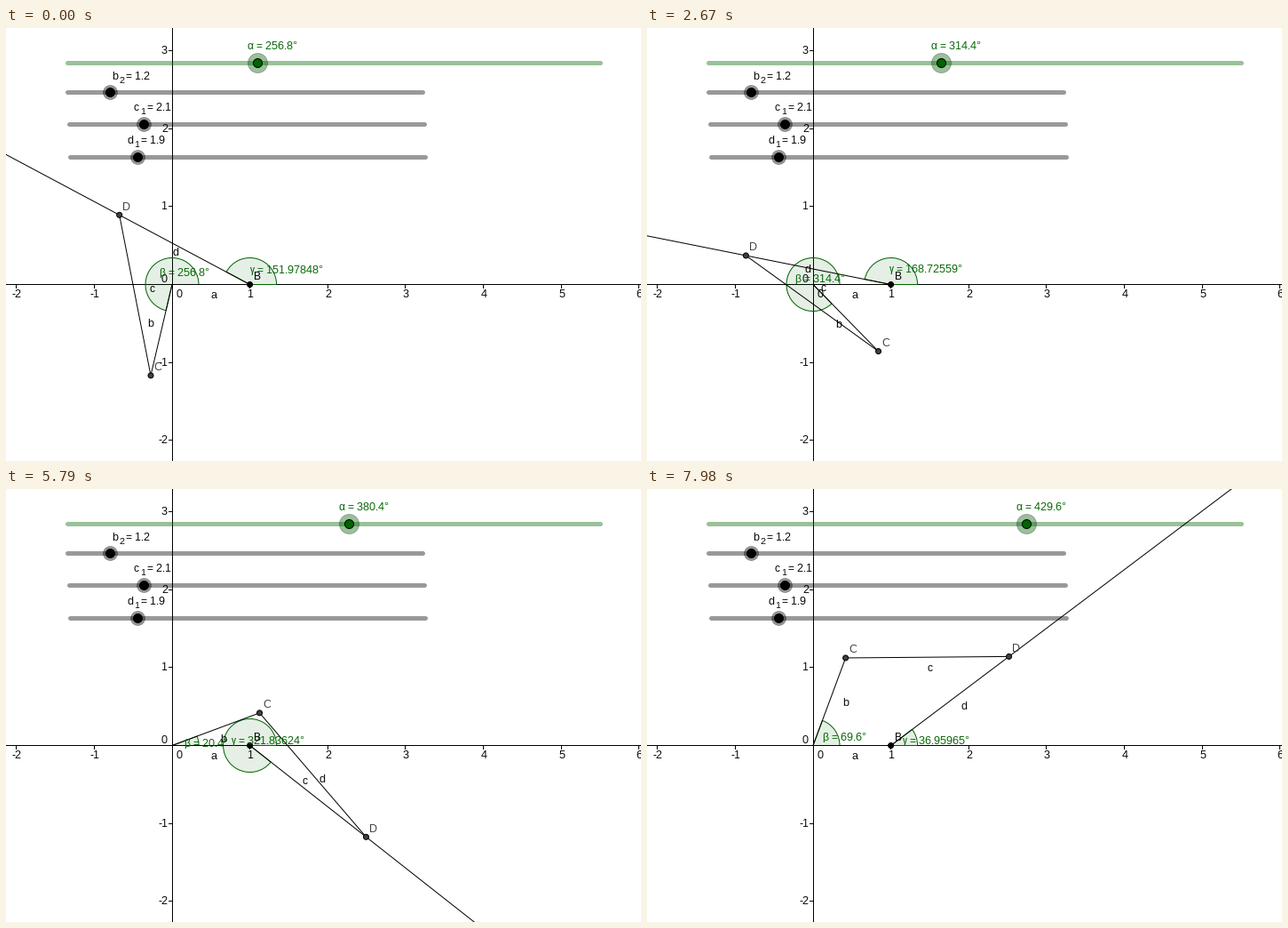
These frames come from a looping animation (715 px wide and 487 px high, 8 s). A matplotlib script:

```python
import numpy as np
import matplotlib.pyplot as plt
from matplotlib.animation import FuncAnimation
from matplotlib.patches import Circle, Wedge

W, H, DPI = 715, 487, 100
PX = 72 / DPI                      # points per pixel
ORIGIN = np.array([187.0, 288.5])
UNIT = 87.6
CRANK, COUPLER, ROCKER = 1.2, 2.1, 1.9
GREEN = (0, 100 / 255, 0)
GREY = "#404040"
SHADE = (0, 0, 0, 0.25)            # rim of the slider knobs
ARC = 30                           # radius of the angle marks

# Times (ms) and the number of slider changes made by then
TIMES = [0, 30, 810, 870, 1380, 1470, 1650, 1710, 2490, 2520, 2670, 2730,
         3270, 3360, 3990, 4020, 4110, 4170, 4950, 4980, 5700, 5790, 5820,
         6510, 6600, 6960, 7020, 7380, 7470, 7980]
COUNTS = [0, 1, 15, 16, 25, 26, 29, 30, 44, 45, 47, 48,
          58, 59, 70, 71, 72, 73, 87, 88, 101, 102, 103,
          116, 117, 123, 124, 131, 132, 142]
STEP_MS, LOOP_MS = 20, 8000

plt.rcParams["font.family"] = "Liberation Sans"
plt.rcParams["text.hinting"] = "native"
plt.rcParams["text.hinting_factor"] = 1
plt.rcParams["path.snap"] = False

fig = plt.figure(figsize=(W / DPI, H / DPI), dpi=DPI, facecolor="white")
ax = fig.add_axes([0, 0, 1, 1])
ax.set_xlim(0, W)
ax.set_ylim(H, 0)
ax.axis("off")


def line(xs, ys, color="black", width=1, **kw):
    return ax.plot(xs, ys, color=color, lw=width * PX, **kw)[0]


def dot(x, y, size, fill, edge="none", zorder=4):
    c = Circle((x, y), size / 2, fc=fill, ec=edge, lw=PX, zorder=zorder)
    return ax.add_patch(c)


def text(x, y, s, color="black", size=12, ha="left"):
    return ax.text(x, y, s, color=color, fontsize=size * PX, ha=ha,
                   va="baseline", zorder=5)


def to_px(x, y):
    return ORIGIN + UNIT * np.array([x, -y])


def polar(r, deg):
    a = np.radians(deg)
    return np.array([r * np.cos(a), r * np.sin(a)])


def fmt(v, digits):
    s = f"{v:.{digits}f}"
    return s.rstrip("0").rstrip(".") + "°"


def draw_grid():
    ox, oy = np.floor(ORIGIN) + 0.5
    line([0, W], [oy, oy], zorder=0)
    line([ox, ox], [0, H], zorder=0)
    for n in range(-2, 7):
        if n == 0:
            continue
        x, y = np.floor(to_px(n, n)) + 0.5
        line([x, x], [oy, oy + 4], zorder=0)
        text(x + 0.5, 303, str(n), ha="center")
        if n < 4:
            line([ox - 4, ox], [y, y], zorder=0)
            text(182, y + 3.5, str(n), ha="right")
    text(192, 303, "0")
    text(182, 286, "0", ha="right")


def draw_track(x, y, length, color):
    line([x, x + length], [y, y], color, 5, alpha=0.4,
         solid_capstyle="round", zorder=1)


def draw_slider(x, y, value, name, sub, tx, ty):
    draw_track(x, y, 400, "black")
    knob = x + 40 * value
    dot(knob, y, 16, (0, 0, 0, 0.4), SHADE, zorder=1.5)
    dot(knob, y, 11, "black", zorder=1.6)
    text(tx, ty, name)
    text(tx + 8, ty + 4, sub, size=10)
    text(tx + 16, ty, f"= {value}")


def sector(center):
    w = Wedge(center, ARC, -90, 0, fc=GREEN + (0.1,), ec=GREEN, lw=PX,
              zorder=0.5)
    return ax.add_patch(w)


draw_grid()
draw_track(69.5, 39.5, 600, GREEN)
draw_slider(69.5, 72.5, 1.2, "b", "2", 119, 58)
draw_slider(71.5, 108.5, 2.1, "c", "1", 143, 93)
draw_slider(72.5, 145.5, 1.9, "d", "1", 136, 130)

halo = dot(0, 39.5, 22, GREEN + (0.4,), SHADE, zorder=1.5)
knob = dot(0, 39.5, 10, GREEN, "black", zorder=1.6)
alpha_text = text(0, 24, "", GREEN)

A, B = to_px(0, 0), to_px(1, 0)
beta_mark, gamma_mark = sector(A), sector(B)
beta_text, gamma_text = text(0, 0, "", GREEN), text(0, 0, "", GREEN)

line([A[0], B[0]], [A[1], B[1]])
crank, coupler, ray = (line([], []) for _ in range(3))
dot(*B, 6, "black", "black")
c_dot, d_dot = (dot(0, 0, 6, GREY, "black") for _ in range(2))
text(230, 304, "a")
text(278, 283, "B")
b_text, c_text, d_text = (text(0, 0, s) for s in "bcd")
C_text, D_text = text(0, 0, "C", GREY), text(0, 0, "D", GREY)


def put(label, pos):
    label.set_position((int(pos[0]), int(pos[1])))


def join(artist, p, q):
    artist.set_data([p[0], q[0]], [p[1], q[1]])


def beside(p, q):
    """Label place 16 px off the middle of a segment."""
    d = (q - p) / np.hypot(*(q - p))
    return (p + q) / 2 + 16 * np.array([-d[1], d[0]])


def show_angle(mark, label, name, vertex, deg, digits):
    mark.set_theta1(-deg)
    label.set_text(f"{name} = {fmt(deg, digits)}")
    x, y = polar(ARC / 1.7, deg / 2)
    put(label, vertex + [x - 3, 5 - y])


def slider_angle(i):
    t = (i * STEP_MS + STEP_MS // 2) // 30 * 30
    n = int(np.interp(t, TIMES, COUNTS) + 1e-9)
    n += (n >= 16) + (n >= 117)    # two places where a step is skipped
    return round((214 + n) * 1.2, 1)


def rocker_angle(c):
    """Direction of BD from the triangle B, C, D."""
    v = c - [1, 0]
    bc = np.hypot(*v)
    cos = (ROCKER**2 + bc**2 - COUPLER**2) / (2 * ROCKER * bc)
    bend = np.arccos(np.clip(cos, -1, 1))
    return np.degrees(np.arctan2(v[1], v[0]) - bend) % 360


def update(i):
    alpha = slider_angle(i)
    x = int(69.5 + alpha / 1.2) + 0.5
    halo.set_center((x, 39.5))
    knob.set_center((x, 39.5))
    alpha_text.set_text("α = " + fmt(alpha, 1))
    put(alpha_text, (x - 11.5, 24))

    c = polar(CRANK, alpha)
    gamma = rocker_angle(c)
    C = to_px(*c)
    D = to_px(*(polar(ROCKER, gamma) + [1, 0]))
    u = (D - B) / np.hypot(*(D - B))

    join(crank, A, C)
    join(coupler, C, D)
    join(ray, B, B + 900 * u)
    for mark, label, p in ((c_dot, C_text, C), (d_dot, D_text, D)):
        mark.set_center(p)
        put(label, p + [4, -5])

    show_angle(beta_mark, beta_text, "β", A, round(alpha % 360, 1), 1)
    show_angle(gamma_mark, gamma_text, "γ", B, gamma, 5)
    put(b_text, beside(A, C))
    put(c_text, beside(C, D))
    put(d_text, (B + D) / 2 + 16 * u * [1, -1])
    return []


anim = FuncAnimation(fig, update, frames=LOOP_MS // STEP_MS,
                     init_func=lambda: update(0), interval=STEP_MS,
                     repeat=True, repeat_delay=0, blit=False)
plt.show()
```
